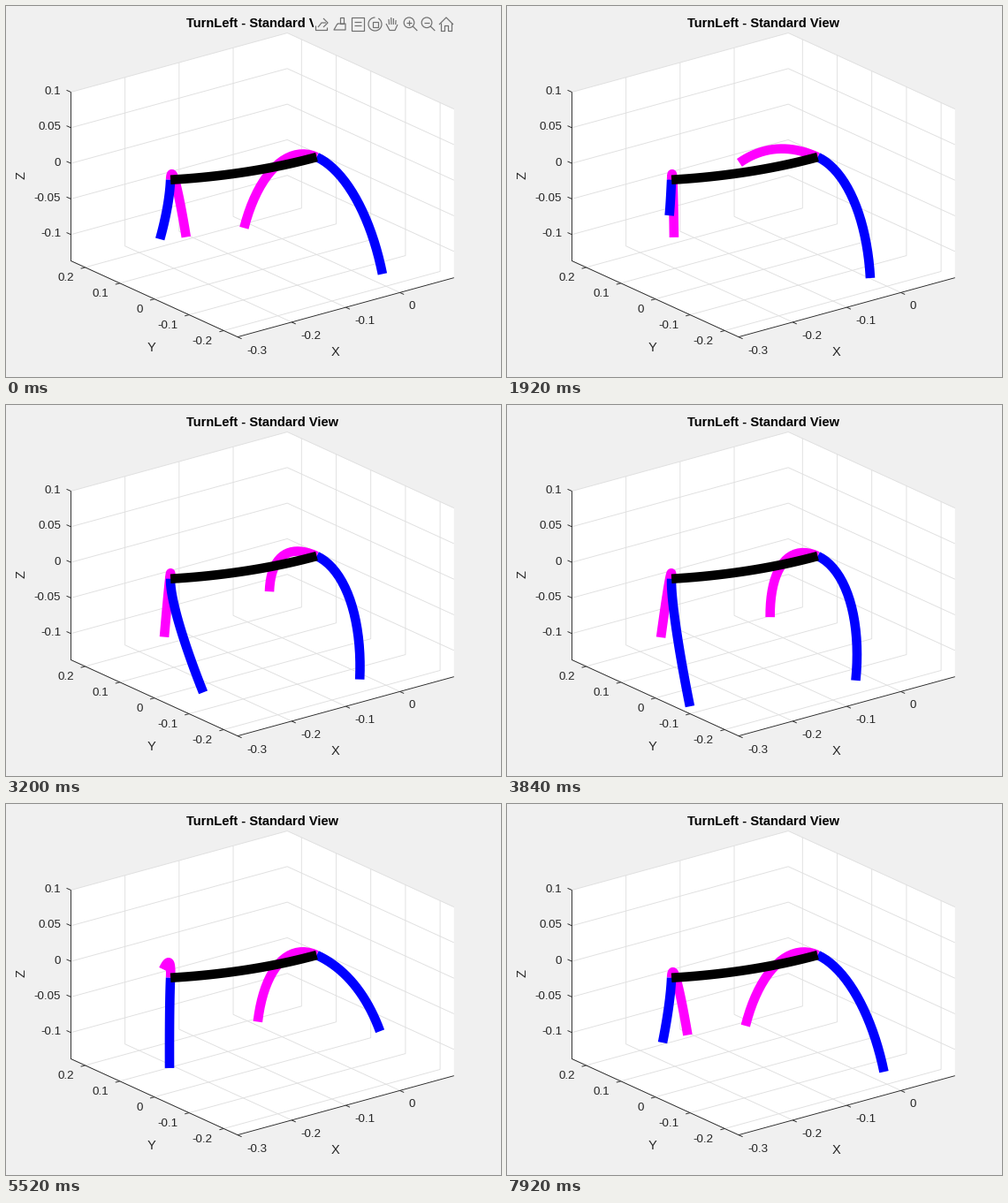
Recreate the animation shown at these times as a matplotlib script. Size 560x420 px, loop 8 s.

```python
from math import comb, cos, exp, hypot, sin

import numpy as np
import matplotlib.pyplot as plt
from matplotlib.animation import FuncAnimation
from matplotlib.patches import Arc, Circle, Polygon, Rectangle

W, H, DPI = 560, 420, 100
FRAMES, INTERVAL = 100, 80
PX = 72 / DPI                      # one pixel in points
INK, GRID, PAPER, ICON = "#262626", "#dfdfdf", "#f0f0f0", "#707070"
BLUE, MAGENTA = "#0000ff", "#ff00ff"

# Orthographic view; one world unit is 0.1 on the axes.
ORIGIN = np.array([351.5, 171.0])
EX = np.array([61.2, -16.75])
EY = np.array([-39.2, -17.9])
EZ = np.array([0.0, -80.6])
X0, X1, Y0, Y1, Z0, Z1 = -3, 1, -2.4, 2.41, -1.37, 1

LENGTH = 2.4                       # every segment of the robot
TURN = 0.585                       # bend of the body in radians
SWING = 49                         # frames a foot spends in the air

fig = plt.figure(figsize=(W / DPI, H / DPI), dpi=DPI, facecolor=PAPER)
ax = fig.add_axes([0, 0, 1, 1])
ax.set_xlim(0, W)
ax.set_ylim(H, 0)
ax.axis("off")


def project(x, y, z):
    return ORIGIN + x * EX + y * EY + z * EZ


def line(points, color, width, z):
    xs, ys = np.transpose(points)
    return ax.plot(xs, ys, color=color, lw=width * PX, zorder=z,
                   solid_capstyle="butt", solid_joinstyle="round")[0]


def text(x, y, s, size=13.33, **style):
    ax.text(x, y, s, fontsize=size * PX, family="Liberation Sans",
            **{"color": INK, "va": "baseline", "ha": "center", **style})


def tick(value, wall, mark, label, ha):
    """Grid line along the walls, tick mark and number at its start."""
    foot = wall[0]
    line(wall, GRID, 0.9, 1)
    line([foot, foot + mark], INK, 0.9, 2)
    text(*(foot + label), f"{value / 10:g}", ha=ha)


def draw_axes():
    outline = [(X0, Y1, Z1), (X1, Y1, Z1), (X1, Y0, Z1),
               (X1, Y0, Z0), (X0, Y0, Z0), (X0, Y1, Z0)]
    ax.add_patch(Polygon([project(*p) for p in outline], fc="white", lw=0, zorder=0))

    for x in range(-3, 1):
        wall = [project(x, Y0, Z0), project(x, Y1, Z0), project(x, Y1, Z1)]
        tick(x, wall, (4.6, 2.1), (10, 19), "left")
    for y in range(-2, 3):
        wall = [project(X0, y, Z0), project(X1, y, Z0), project(X1, y, Z1)]
        tick(y, wall, (-4.9, 1.35), (-12.7, 15.2), "right")
    for z in np.arange(-1, 1.1, 0.5):
        wall = [project(X0, Y1, z), project(X1, Y1, z), project(X1, Y0, z)]
        tick(z, wall, (-4.9, -2.2), (-11.4, 2.5), "right")

    line([project(X0, Y1, Z1), project(X0, Y1, Z0),
          project(X0, Y0, Z0), project(X1, Y0, Z0)], INK, 0.9, 2)

    text(373, 396, "X", 14.67)
    text(164, 391, "Y", 14.67)
    text(21.5, 192, "Z", 14.67, rotation=90, rotation_mode="anchor")
    text(290.3, 24, "TurnLeft - Standard View", 14.67, weight="bold", color="black")


def draw_toolbar():
    parts = []

    def add(patch):
        parts.append(ax.add_patch(patch))

    def stroke(*points):
        parts.append(line(points, ICON, 1.2, 9))

    def outline(shape, *size, **style):
        add(shape(*size, fill=False, ec=ICON, lw=1.2 * PX, zorder=9, **style))

    add(Rectangle((348, 10), 160, 21, fc=PAPER, lw=0, zorder=8))

    # export
    stroke((350, 22), (350, 27), (363, 27), (363, 24))
    stroke((353, 24), (357, 19), (362, 19))
    stroke((359, 14), (364, 19), (359, 24))
    # brush
    outline(Rectangle, (378, 13), 4, 7)
    stroke((375, 20), (371, 27), (384, 27), (384, 20), (375, 20))
    # data tip
    outline(Rectangle, (391, 13), 14, 15)
    for y in (18, 22):
        stroke((394, y), (402, y))
    # rotate
    outline(Arc, (417.5, 20.5), 15, 15, theta1=-60, theta2=270)
    outline(Rectangle, (414.5, 17.5), 6, 6)
    # pan
    for i, top in enumerate((15, 13, 14, 16)):
        stroke((433 + 2.7 * i, top), (433.5 + 2.4 * i, 21))
    stroke((430, 20), (434, 27.5), (440, 27.5), (443, 21))
    # zoom in and out
    for x in (456, 476):
        outline(Circle, (x, 18.8), 5.8)
        stroke((x + 4.2, 23), (x + 9.3, 28))
        stroke((x - 3, 18.8), (x + 3, 18.8))
    stroke((456, 15.8), (456, 21.8))
    # home
    stroke((490, 21), (498, 13), (506, 21))
    stroke((492, 19), (492, 28), (496, 28), (496, 22),
           (500, 22), (500, 28), (504, 28), (504, 19))
    return parts


S = np.linspace(0, 1, 21)[:, None]
ANGLES = np.linspace(0.01, 2.2, 400)
REACH = LENGTH * (1 - np.cos(ANGLES)) / ANGLES


def arc(base, along, toward, angle):
    """Constant-curvature segment leaving base, bending to one side."""
    return base + LENGTH / angle * (np.sin(angle * S) * along
                                    + (1 - np.cos(angle * S)) * toward)


def limb(base, along, forward, down, ahead):
    """Segment whose tip lies at the given offsets below and ahead of its axis."""
    reach = max(hypot(down, ahead), 0.02)
    angle = np.interp(reach, REACH, ANGLES)
    return arc(base, along, (ahead * forward - down * EZ) / reach, angle)


def bezier(points, u):
    n = len(points) - 1
    return sum(comb(n, i) * u ** i * (1 - u) ** (n - i) * p
               for i, p in enumerate(points))


def foot(path, phase, slack):
    """Swing along a curve, then return: steadily, or sinking if slack."""
    if phase < SWING:
        return bezier(path, phase / SWING)
    if slack:
        back = 1 - exp(-max(phase - SWING - 5, 0) / 17)
    else:
        back = (phase - SWING) / (FRAMES - SWING)
    return path[-1] + (path[0] - path[-1]) * back


# Control points of each swing: (down, ahead)
LEFT = np.array([(1.345, -.21), (-.11, -.89), (.82, 1.0), (1.345, .225)])
FRONT_RIGHT = np.array([(1.255, -.47), (-.18, -1.73), (.78, 2.02), (1.21, -.01)])
REAR_RIGHT = np.array([(.11, -.128), (-1.6, -.12), (-.63, -.8), (1.5, 1.37), (1.24, .23)])

draw_axes()
toolbar = draw_toolbar()

body = arc(ORIGIN, -EX, EY, TURN)
rear = body[-1]
rear_forward = cos(TURN) * EX - sin(TURN) * EY
rear_left = sin(TURN) * EX + cos(TURN) * EY
line(body, "black", 10.6, 6)

# base, axis, forward, path, first frame of the swing
LEGS = [(ORIGIN, EY, EX, LEFT, 0),
        (rear, rear_left, rear_forward, LEFT, 50),
        (ORIGIN, -EY, EX, FRONT_RIGHT, 50),
        (rear, -rear_left, rear_forward, REAR_RIGHT, 0)]
artists = [line([leg[0], leg[0]], color, 10.6, z)
           for leg, color, z in zip(LEGS, (MAGENTA, MAGENTA, BLUE, BLUE), (4, 4, 5, 5))]


def update(frame):
    for artist, (base, along, forward, path, start) in zip(artists, LEGS):
        tip = foot(path, (frame - start) % FRAMES, path is REAR_RIGHT)
        artist.set_data(*limb(base, along, forward, *tip).T)
    for part in toolbar:
        part.set_visible(frame == 0)
    return artists + toolbar


anim = FuncAnimation(fig, update, frames=FRAMES, interval=INTERVAL,
                     repeat=True, repeat_delay=0, blit=False)
plt.show()
```
